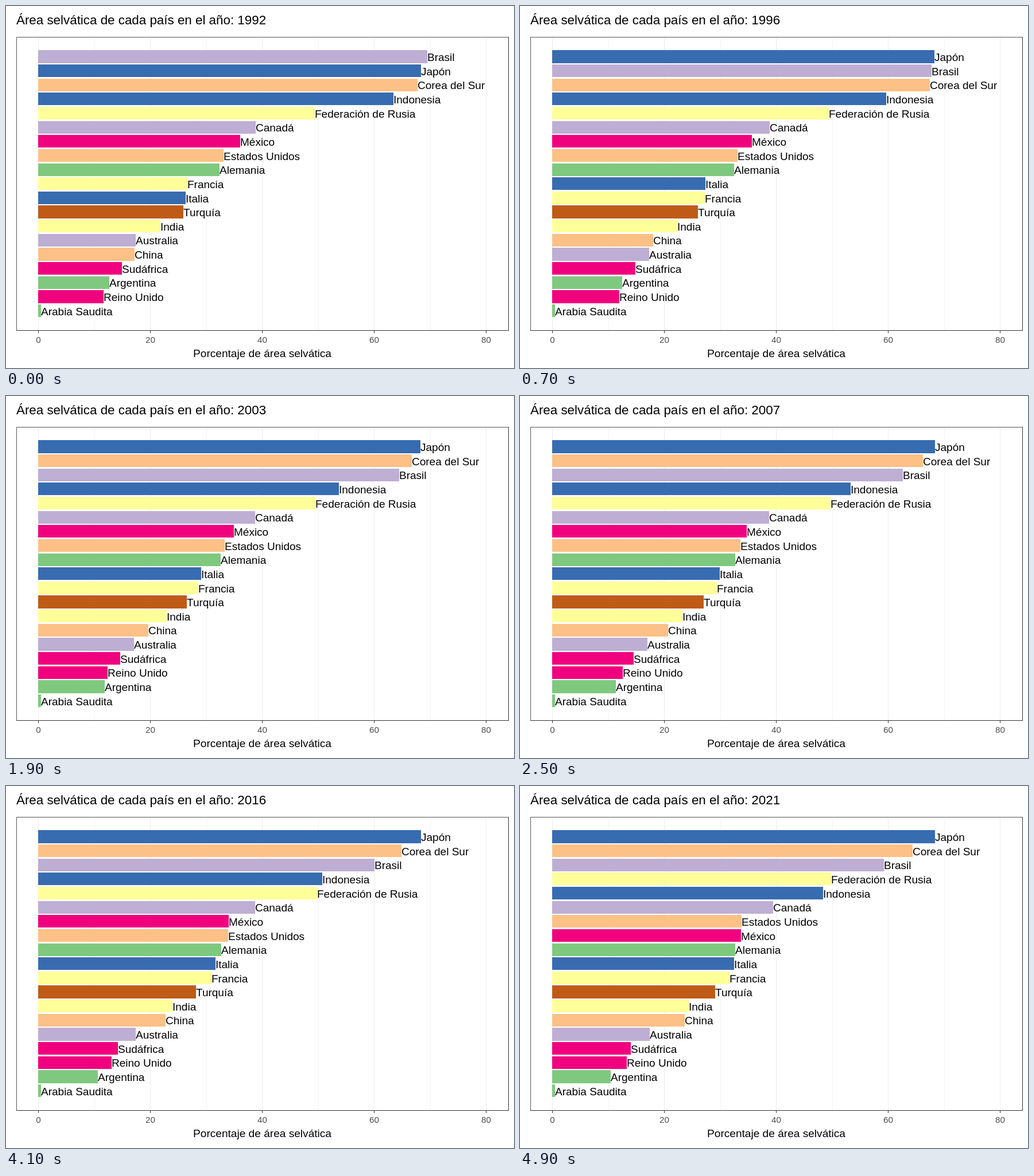
An HTML page that plays this animation: 885 px wide and 632 px high, repeating every 5 s.

```html
<!DOCTYPE html>
<html lang="es">
<head>
<meta charset="utf-8">
<title>Área selvática</title>
<style>
  html, body { margin: 0; width: 100%; height: 100%; overflow: hidden; background: #fff; }
  svg { display: block; width: 885px; height: 632px; }
  text { font-family: "Liberation Sans", Arial, sans-serif; font-size: 19px; white-space: pre; }
  rect, line { shape-rendering: crispEdges; }
  .title { font-size: 22.36px; }
  .axis { font-size: 19.1px; text-anchor: middle; }
  .tick { font-size: 15.2px; fill: #4d4d4d; text-anchor: middle; }
</style>
</head>
<body>
<svg id="chart" viewBox="0 0 885 632"></svg>
<script>
const FRAMES = 50, STEP = 100, FIRST = 1992, LAST = 2021;
const X0 = 56.4, UNIT = 9.745, ROW0 = 88.4, ROW = 24.65, HALF = 11.1;
const COLORS = ['#7fc97f', '#beaed4', '#fdc086', '#ffff99', '#386cb0', '#f0027f', '#bf5b17'];

// Share of land at each of these years; "extra" adds a sudden change.
const KNOTS = [1992, 2000, 2007, 2012, 2016, 2021];
const COUNTRIES = [
  { name: 'Alemania', share: [32.39, 32.53, 32.68, 32.73, 32.73, 32.73] },
  { name: 'Arabia Saudita', share: [.45, .45, .45, .45, .45, .45] },
  { name: 'Argentina', share: [12.73, 12.2, 11.35, 10.89, 10.63, 10.43] },
  { name: 'Australia', share: [17.37, 17.16, 16.99, 17.04, 17.45, 17.42] },
  { name: 'Brasil', share: [69.55, 65.96, 62.66, 60.86, 60.09, 59.27] },
  { name: 'Canadá', share: [38.85, 38.8, 38.75, 38.73, 38.7, 39.46], extra: [2020, 38.7] },
  { name: 'China', share: [17.16, 18.85, 20.64, 21.8, 22.69, 23.66] },
  { name: 'Corea del Sur', share: [67.78, 67.13, 66.2, 65.43, 64.92, 64.4] },
  { name: 'Estados Unidos', share: [33.1, 33.13, 33.57, 33.82, 33.92, 33.87] },
  { name: 'Federación de Rusia', share: [49.4, 49.42, 49.7, 49.79, 49.79, 49.83] },
  { name: 'Francia', share: [26.68, 27.92, 29.41, 30.33, 30.95, 31.7] },
  { name: 'India', share: [21.82, 22.74, 23.25, 23.56, 23.97, 24.38] },
  { name: 'Indonesia', share: [63.53, 53.94, 53.34, 52.09, 50.75, 48.4], extra: [1999, 56.86, 2020, 49.07] },
  { name: 'Italia', share: [26.34, 28.46, 29.92, 30.93, 31.67, 32.52] },
  { name: 'Japón', share: [68.38, 68.25, 68.4, 68.5, 68.42, 68.4] },
  { name: 'México', share: [36.13, 35.15, 34.7, 34.34, 34.06, 33.72] },
  { name: 'Reino Unido', share: [11.63, 12.22, 12.53, 12.79, 13.09, 13.3] },
  { name: 'Sudáfrica', share: [14.89, 14.69, 14.48, 14.27, 14.2, 14.02] },
  { name: 'Turquía', share: [25.87, 26.2, 27.03, 27.66, 28.16, 29.08] }
];

const svg = document.getElementById('chart');
const mix = (a, b, p) => a + (b - a) * p;

function add(tag, attrs, text) {
  const el = document.createElementNS('http://www.w3.org/2000/svg', tag);
  for (const key in attrs) el.setAttribute(key, attrs[key]);
  if (text !== undefined) el.textContent = text;
  return svg.appendChild(el);
}

const box = (x, y, width, height, fill) => add('rect', { x, y, width, height, fill });

function shareAt(country, year) {
  const pts = KNOTS.map((y, i) => [y, country.share[i]]);
  const extra = country.extra || [];
  for (let i = 0; i < extra.length; i += 2) pts.push([extra[i], extra[i + 1]]);
  pts.sort((a, b) => a[0] - b[0]);
  const n = Math.max(1, pts.findIndex(p => p[0] >= year));
  const [a, b] = [pts[n - 1], pts[n]];
  return mix(a[1], b[1], (year - a[0]) / (b[0] - a[0]));
}

// Yearly values and ranks, each year pinned to a whole step of the loop.
const years = [];
for (let year = FIRST; year <= LAST; year++) {
  const values = COUNTRIES.map(c => shareAt(c, year));
  const ranks = values.map(v => values.filter(w => w > v).length);
  const at = Math.round((year - FIRST) * (FRAMES - 1) / (LAST - FIRST));
  years.push({ at, values, ranks });
}

// Static parts of the plot
box(0, 0, 885, 632, '#fff');
for (let v = 0; v <= 80; v += 10) {
  box(Math.round(X0 + v * UNIT), 55, 1, 511, v % 20 ? '#f3f3f3' : '#ebebeb');
}
const bars = COUNTRIES.map((c, i) => box(56, 0, 0, 0, COLORS[Math.floor(i / 3)]));
const labels = COUNTRIES.map(c => add('text', {}, c.name));
box(18, 54, 858, 1, '#555');
box(18, 54, 1, 513, '#555');
box(18, 566, 858, 1, '#333');
box(875, 54, 1, 513, '#333');
for (let v = 0; v <= 80; v += 20) {
  const x = Math.round(X0 + v * UNIT);
  box(x, 567, 1, 4, '#333');
  add('text', { class: 'tick', x: x + .5, y: 588 }, v);
}
add('text', { class: 'axis', x: 446.5, y: 613 }, 'Porcentaje de área selvática');
const title = add('text', { class: 'title', x: 18, y: 31.5 });

function draw(frame) {
  const n = Math.max(1, years.findIndex(y => y.at >= frame));
  const [a, b] = [years[n - 1], years[n]];
  const p = (frame - a.at) / (b.at - a.at);
  COUNTRIES.forEach((c, i) => {
    const end = Math.round(X0 + UNIT * mix(a.values[i], b.values[i], p));
    const mid = ROW0 + ROW * mix(a.ranks[i], b.ranks[i], p);
    const top = Math.round(mid - HALF);
    bars[i].setAttribute('y', top);
    bars[i].setAttribute('width', end - 56);
    bars[i].setAttribute('height', Math.round(mid + HALF) - top);
    labels[i].setAttribute('x', end);
    labels[i].setAttribute('y', Math.round(mid + 7.6));
  });
  const year = Math.round(mix(FIRST, LAST, frame / (FRAMES - 1)));
  title.textContent = 'Área selvática de cada país en el año: ' + year;
}

const start = performance.now();
let shown = -1;
function tick(now) {
  const frame = Math.floor(Math.max(0, now - start) / STEP) % FRAMES;
  if (frame !== shown) draw(shown = frame);
  requestAnimationFrame(tick);
}
tick(start);
</script>
</body>
</html>
```
